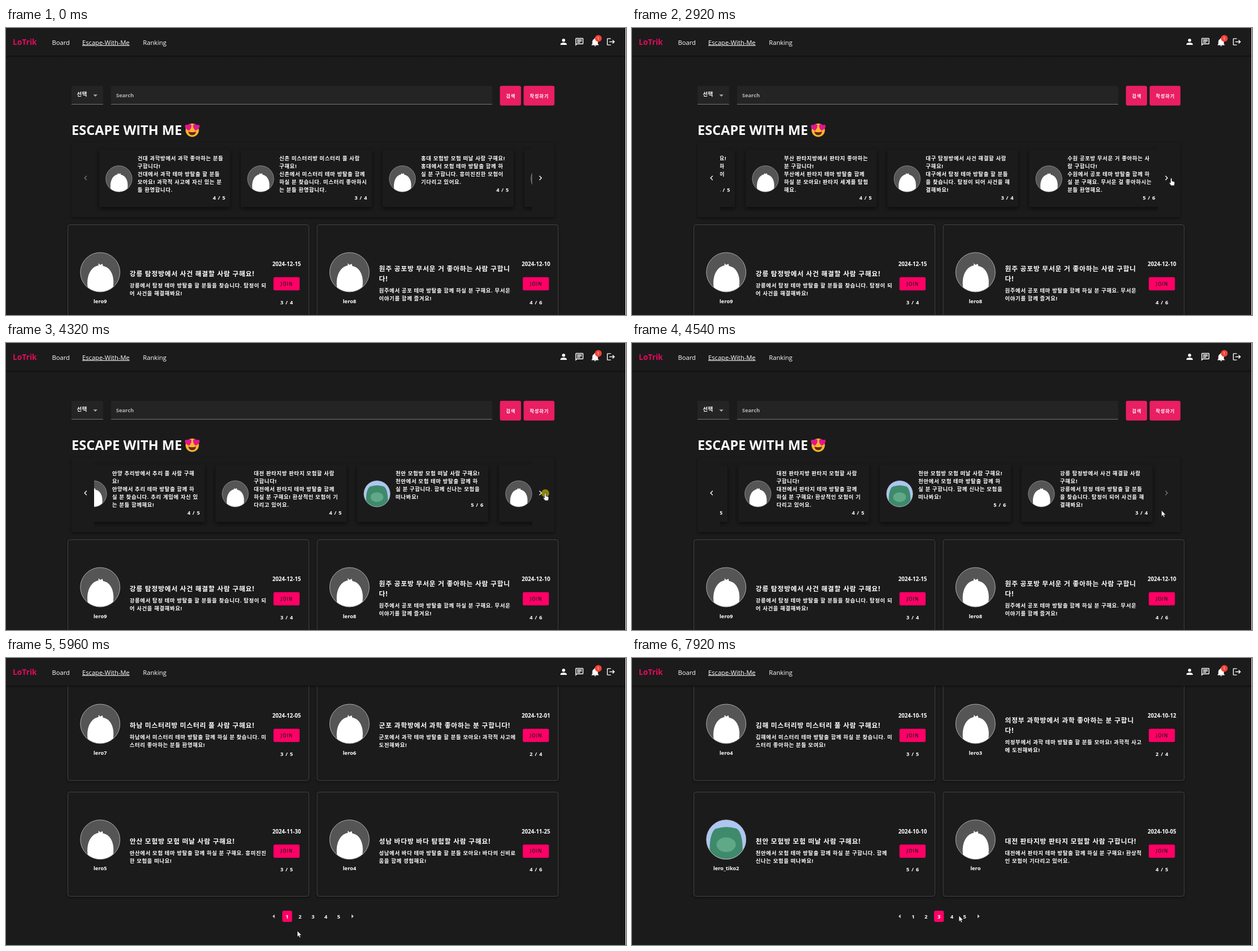
Write an HTML page that moves like this. It is 1098 by 510 pixels and loops after 7990 ms.

```html
<!DOCTYPE html>
<html lang="ko">
<head>
<meta charset="utf-8">
<title>Escape board</title>
<style>
html, body { margin: 0; width: 100%; height: 100%; overflow: hidden; background: #1b1b1b; }
svg { display: block; }
text { font: 700 9.4px "Open Sans", "Noto Sans CJK KR", "Noto Sans CJK", sans-serif; letter-spacing: .68px; fill: #fff; }
.mid { text-anchor: middle; }
.end { text-anchor: end; }
.nav { font-weight: 400; font-size: 11.2px; letter-spacing: 0; }
.logo { font-size: 13.8px; letter-spacing: 0; fill: #e6095f; }
.head { font-size: 23.6px; letter-spacing: 0; }
.title { font-size: 11.8px; letter-spacing: .78px; }
.date { font-size: 9.7px; letter-spacing: 0; }
.name { font-size: 9.4px; letter-spacing: 0; }
.field { letter-spacing: 0; fill: #b4b4b4; }
.join { font-weight: 600; font-size: 8.2px; letter-spacing: .9px; fill: #1b1b1b; }
.btn { font-size: 8.2px; letter-spacing: 1px; }
.badge { font-weight: 400; font-size: 7.5px; letter-spacing: 0; }
.tile { fill: #1b1b1b; filter: drop-shadow(0 3px 4px #0009); }
.tile.hover { fill: #252525; }
.box { fill: #1b1b1b; stroke: #454545; filter: drop-shadow(0 2px 2px #0006); }
</style>
</head>
<body>
<svg id="stage" width="1098" height="510" viewBox="0 0 1098 510"></svg>
<script>
const LOOP = 7990, PITCH = 205.7, PAGE_SCROLL = 522.7, SLIDE_STEP = 251;

// text, member count, has photo
const slides = [
  ['건대 과학방에서 과학 좋아하는 분들|구합니다!|건대에서 과학 테마 방탈출 할 분들|모아요! 과학적 사고에 자신 있는 분|들 환영합니다.', '4 / 5'],
  ['신촌 미스터리방 미스터리 풀 사람|구해요!|신촌에서 미스터리 테마 방탈출 함께|하실 분 찾습니다. 미스터리 좋아하시|는 분들 환영합니다.', '3 / 4'],
  ['홍대 모험방 모험 떠날 사람 구해요!|홍대에서 모험 테마 방탈출 함께 하|실 분 구합니다. 흥미진진한 모험이|기다리고 있어요.', '4 / 5'],
  ['부산 판타지방에서 판타지 좋아하는|분 구합니다!|부산에서 판타지 테마 방탈출 함께|하실 분 모아요! 판타지 세계를 탐험|해요.', '4 / 5'],
  ['대구 탐정방에서 사건 해결할 사람|구해요!|대구에서 탐정 테마 방탈출 할 분들|을 찾습니다. 탐정이 되어 사건을 해|결해봐요!', '3 / 4'],
  ['수원 공포방 무서운 거 좋아하는 사|람 구합니다!|수원에서 공포 테마 방탈출 함께 하|실 분 구해요. 무서운 걸 좋아하시는|분들 환영해요.', '5 / 6'],
  ['안양 추리방에서 추리 풀 사람 구해|요!|안양에서 추리 테마 방탈출 함께 하|실 분 찾습니다. 추리 게임에 자신 있|는 분들 함께해요!', '4 / 5'],
  ['대전 판타지방 판타지 모험할 사람|구합니다!|대전에서 판타지 테마 방탈출 함께|하실 분 구해요! 환상적인 모험이 기|다리고 있어요.', '4 / 5'],
  ['천안 모험방 모험 떠날 사람 구해요!|천안에서 모험 테마 방탈출 함께 하|실 분 구합니다. 함께 신나는 모험을|떠나봐요!', '5 / 6', true],
  ['강릉 탐정방에서 사건 해결할 사람|구해요!|강릉에서 탐정 테마 방탈출 할 분들|을 찾습니다. 탐정이 되어 사건을 해|결해봐요!', '3 / 4'],
];

// Pages 2 and 3 are only seen scrolled down, so they hold just their lower two rows.
const pages = [[
  ['2024-12-15', '3 / 4', 'lero9', '강릉 탐정방에서 사건 해결할 사람 구해요!', '강릉에서 탐정 테마 방탈출 할 분들을 찾습니다. 탐정이 되|어 사건을 해결해봐요!'],
  ['2024-12-10', '4 / 6', 'lero8', '원주 공포방 무서운 거 좋아하는 사람 구합니|다!', '원주에서 공포 테마 방탈출 함께 하실 분 구해요. 무서운|이야기를 함께 즐겨요!'],
  ['2024-12-05', '3 / 5', 'lero7', '하남 미스터리방 미스터리 풀 사람 구해요!', '하남에서 미스터리 테마 방탈출 함께 하실 분 찾습니다. 미|스터리 좋아하는 분들 환영해요!'],
  ['2024-12-01', '2 / 4', 'lero6', '군포 과학방에서 과학 좋아하는 분 구합니다!', '군포에서 과학 테마 방탈출 할 분들 모아요! 과학적 사고에|도전해봐요!'],
  ['2024-11-30', '3 / 5', 'lero5', '안산 모험방 모험 떠날 사람 구해요!', '안산에서 모험 테마 방탈출 함께 하실 분 구해요. 흥미진진|한 모험을 떠나요!'],
  ['2024-11-25', '4 / 6', 'lero4', '성남 바다방 바다 탐험할 사람 구해요!', '성남에서 바다 테마 방탈출 할 분들 모아요! 바다의 신비로|움을 함께 경험해요!'],
], [
  ['2024-11-10', '4 / 5', 'lero1', '안양 추리방에서 추리 풀 사람 구해요!', '안양에서 추리 테마 방탈출 함께 하실 분 찾습니다. 추리|게임에 자신 있는 분들 함께해요!'],
  ['2024-11-05', '5 / 6', 'lero9', '수원 공포방 무서운 거 좋아하는 사람 구합니|다!', '수원에서 공포 테마 방탈출 함께 하실 분 구해요. 무서운|걸 좋아하시는 분들 환영해요.'],
  ['2024-11-01', '3 / 4', 'lero8', '대구 탐정방에서 사건 해결할 사람 구해요!', '대구에서 탐정 테마 방탈출 할 분들을 찾습니다. 탐정이 되|어 사건을 해결해봐요!'],
  ['2024-10-25', '4 / 5', 'lero7', '부산 판타지방에서 판타지 좋아하는 분 구합|니다!', '부산에서 판타지 테마 방탈출 함께 하실 분 모아요! 판타지|세계를 탐험해요.'],
], [
  ['2024-10-15', '3 / 5', 'lero4', '김해 미스터리방 미스터리 풀 사람 구해요!', '김해에서 미스터리 테마 방탈출 함께 하실 분 찾습니다. 미|스터리 좋아하는 분들 모여요!'],
  ['2024-10-12', '2 / 4', 'lero3', '의정부 과학방에서 과학 좋아하는 분 구합니|다!', '의정부에서 과학 테마 방탈출 할 분들 모아요! 과학적 사고|에 도전해봐요!'],
  ['2024-10-10', '5 / 6', 'lero_tiko2', '천안 모험방 모험 떠날 사람 구해요!', '천안에서 모험 테마 방탈출 함께 하실 분 구합니다. 함께|신나는 모험을 떠나봐요!', true],
  ['2024-10-05', '4 / 5', 'lero', '대전 판타지방 판타지 모험할 사람 구합니다!', '대전에서 판타지 테마 방탈출 함께 하실 분 구해요! 환상적|인 모험이 기다리고 있어요.'],
]];

const text = (x, y, s, cls = '', more = '') => `<text x="${x}" y="${y}" class="${cls}" ${more}>${s}</text>`;
const lines = (x, y, s, step, cls) => s.split('|').map((l, i) => text(x, y + i * step, l, cls)).join('');
const rect = (x, y, w, h, r, fill) => `<rect x="${x}" y="${y}" width="${w}" height="${h}" rx="${r}" fill="${fill}"/>`;
const path = (d, fill = '#fff', more = '') => `<path d="${d}" fill="${fill}" ${more}/>`;
const group = (x, y, body) => `<g transform="translate(${x} ${y})">${body}</g>`;
// 24-unit icon centred on x, y
const icon = (x, y, d, id = '') => `<g id="${id}" transform="translate(${x} ${y}) scale(.7) translate(-12 -12)">${path(d, '#fff', 'fill-rule="evenodd"')}</g>`;

const drake = path('M-22 27C-25 6-16-10-3-12L-3-16 0-13 4-15 5-11C19-9 26 8 23 26A35 35 0 0 1-22 27Z');
const seal = path('M-29 19C-30-2-24-20-16-20Q0-25 17-20C25-18 30 0 29 19A35 35 0 0 1-29 19Z', '#3f8a6b') +
  '<ellipse cy="9" rx="17" ry="13" fill="#5fa888"/>';
const avatar = (x, y, r, photo) => `<g transform="translate(${x} ${y}) scale(${r / 35})">
  <circle r="35" fill="${photo ? '#adc6f2' : '#555'}"/>${photo ? seal : drake}
  <circle r="35" fill="none" stroke="#bbb" stroke-width=".9"/></g>`;

const slide = ([body, count, photo], i) => group(165 + i * SLIDE_STEP, 216,
  `<rect class="tile" width="232" height="102" rx="2"/>` + avatar(35, 52, 23.2, photo) +
  lines(68, 19.3, body, 14) + text(224, 19.3 + 14 * body.split('|').length, count, 'end'));

function post([date, count, name, title, body, photo], n) {
  const rows = title.split('|').length, y = 91.6 - (rows - 1) * 9;
  return group(n % 2 ? 551 : 109.5, 349.5 + (n >> 1) * PITCH,
    `<rect class="box" width="427" height="185.3" rx="4"/>` + avatar(57.3, 84.5, 35, photo) +
    text(57.3, 139, name, 'name mid') + lines(109.5, y, title, 18, 'title') +
    lines(109.5, y + rows * 18 + 2.2, body, 14) + text(387.5, 73.5, date, 'date mid') +
    rect(364.2, 93.3, 46.3, 23.4, 2.5, '#ff0066') + text(387.8, 108, 'JOIN', 'join mid') +
    text(387.8, 141, count, 'mid'));
}

const numbers = [0, 1, 2, 3, 4];
const pageX = n => 498 + n * 22.8;
const pagerY = 459 + PAGE_SCROLL;
const heart = (x, y, turn) => `<g transform="translate(${x} ${y}) rotate(${turn})">${path('M0 6.5C-8 1-6.5-5-3-5-1-5 0-3 0-3S1-5 3-5C6.5-5 8 1 0 6.5Z', '#e3148f')}</g>`;

stage.innerHTML = `<defs>
  <linearGradient id="shade" x2="0" y2="1"><stop stop-color="#000" stop-opacity=".45"/><stop offset="1" stop-opacity="0"/></linearGradient>
  <clipPath id="view"><rect x="156" y="203" width="776" height="124"/></clipPath></defs>
  ${rect(0, 0, 1098, 510, 0, '#1b1b1b')}
  <g id="content">
    ${rect(116, 103, 56, 32, 2, '#242424') + rect(116, 135, 56, 1, 0, '#777')}
    ${text(125.5, 120.9, '선택') + path('M154.5 118.3h7.4l-3.7 3.7z', '#aaa')}
    ${rect(186, 103, 675, 32, 2, '#242424') + rect(186, 135, 675, 1, 0, '#777')}
    ${text(195, 122.5, 'Search', 'field')}
    ${rect(874.7, 102.7, 37.4, 35, 3, '#e91e63') + text(894, 123.6, '검색', 'btn mid')}
    ${rect(916.7, 102.7, 54.6, 35, 3, '#e91e63') + text(944.5, 123.6, '작성하기', 'btn mid')}
    ${text(116, 189.5, 'ESCAPE WITH ME', 'head')}
    ${group(329.8, 181.6, '<circle r="11.8" fill="#fdb52c"/>' +
      path('M-6.8 2.5q7 2.5 13.6 0-1 6.5-6.8 6.5t-6.8-6.5z', '#5a2a1a') + heart(-6.8, -5.5, -12) + heart(7, -5.5, 12))}
    <rect class="tile" x="116" y="203" width="855" height="133" style="filter:drop-shadow(0 2px 2px #0007)"/>
    <g clip-path="url(#view)"><g id="track">${slides.map(slide).join('')}</g></g>
    ${icon(141, 266.5, 'M15.4 16.6L10.8 12l4.6-4.6L14 6l-6 6 6 6z', 'prevBtn')}
    ${icon(946.5, 266.5, 'M8.6 16.6L13.2 12 8.6 7.4 10 6l6 6-6 6z', 'nextBtn')}
    ${pages.map(p => `<g class="page">${p.map((q, i) => post(q, i + 6 - p.length)).join('')}</g>`).join('')}
    ${path(`M475.7 ${pagerY - 3.5}v7l-3.7-3.5z`, '#ccc') + path(`M612 ${pagerY - 3.5}v7l3.7-3.5z`, '#ccc')}
    <rect id="active" y="${pagerY - 10}" width="17.4" height="20" rx="3" fill="#ff0066"/>
    ${numbers.map(n => text(pageX(n) + .3, pagerY + 3.6, n + 1, 'mid')).join('')}
  </g>
  ${rect(0, 0, 1098, 49, 0, '#1b1b1b') + rect(0, 49, 1098, 4, 0, 'url(#shade)')}
  ${text(12, 29.5, 'LoTrik', 'logo') + text(81.5, 29.5, 'Board', 'nav')}
  ${text(135, 29.5, 'Escape-With-Me', 'nav', 'text-decoration="underline"') + text(242.5, 29.5, 'Ranking', 'nav')}
  ${icon(987.5, 24.5, 'M12 4a4 4 0 1 1 0 8a4 4 0 0 1 0-8m0 10c4.4 0 8 1.8 8 4v2H4v-2c0-2.2 3.6-4 8-4z')}
  ${icon(1015.5, 24.8, 'M20 2H4a2 2 0 0 0-2 2v18l4-4h14a2 2 0 0 0 2-2V4a2 2 0 0 0-2-2M4 4h16v12H5.2L4 17.2zM6 6h12v2H6zM6 9h12v2H6zM6 12h8v2H6z')}
  ${icon(1043.3, 24.8, 'M21 19v1H3v-1l2-2v-6c0-3.1 2-5.8 5-6.7V4a2 2 0 0 1 4 0v.3c3 .9 5 3.6 5 6.7v6zM14 21a2 2 0 0 1-4 0z')}
  ${icon(1071.3, 24.5, 'M17 7l-1.4 1.4 2.6 2.6H8v2h10.2l-2.6 2.6L17 17l5-5zM4 5h8V3H4a2 2 0 0 0-2 2v14a2 2 0 0 0 2 2h8v-2H4z')}
  <circle cx="1049" cy="18.6" r="6" fill="#f44336"/>${text(1049, 21.4, '1', 'mid badge')}
  ${rect(1097, 0, 1, 510, 0, '#fff')}
  <g id="pointer" stroke="#111" stroke-width=".6">
    <circle id="press" r="7" fill="#fff000" fill-opacity=".5" stroke="none"/>
    ${path('M0 0v10.5l2.4-2.2 1.6 3.7 1.8-.8-1.6-3.6h3.2z', '#fff', 'id="arrow"')}
    ${path('M-1.2 1q0-1.2 1.2-1.2t1.2 1.2v4l3.6 1q1.5.4 1.3 2l-.8 5h-5.6l-3.4-4.6q.4-1.5 2.5 0z', '#fff', 'id="finger"')}
  </g>`;

// time, x, y of the pointer
const moves = [
  [120, 974, 462], [190, 800, 400], [260, 580, 310], [330, 437, 250], [460, 437, 250],
  [530, 440, 270], [600, 400, 272], [670, 365, 235], [740, 390, 185], [810, 450, 163],
  [880, 500, 180], [950, 511, 220], [1020, 450, 195], [1090, 385, 162], [1880, 385, 162],
  [1950, 468, 185], [2090, 620, 215], [2280, 870, 258], [2420, 978, 268], [2650, 955, 267],
  [4460, 955, 267], [4530, 945, 295], [4660, 860, 325], [4790, 700, 250], [4920, 550, 131],
  [5080, 430, 190], [5290, 378.5, 277], [5760, 378.5, 277], [5830, 420, 350], [5900, 490, 450],
  [5960, 516, 485], [6030, 516, 485], [6240, 521, 462], [6570, 521, 462], [6850, 551, 465],
  [6910, 551, 465], [7170, 551, 458], [7580, 551, 458], [7920, 579, 458],
];
const clicks = [2780, 3530, 4320, 6380, 7440];
const offsets = [0, 775.5, 1551, 1734];
const easeOut = p => 1 - (1 - Math.min(1, Math.max(0, p))) ** 2;
const show = (el, on) => el.style.display = on ? '' : 'none';
const tiles = [...track.querySelectorAll('.tile')];
const pageEls = document.querySelectorAll('.page');

function pointerAt(t) {
  const i = moves.findIndex(m => m[0] > t);
  if (i < 1) return moves.at(i).slice(1);
  const [t0, x0, y0] = moves[i - 1], [t1, x1, y1] = moves[i], p = (t - t0) / (t1 - t0);
  return [x0 + (x1 - x0) * p, y0 + (y1 - y0) * p];
}

function draw(t) {
  const [x, y] = pointerAt(t);
  const scroll = PAGE_SCROLL * easeOut((t - 5445) / 185);
  const shift = clicks.slice(0, 3).reduce((sum, c, i) =>
    sum + (offsets[i + 1] - offsets[i]) * easeOut((t - c - 12) / 178), 0);
  const page = t < 6450 ? 0 : t < 7510 ? 1 : 2;
  const canNext = shift < offsets[3] - .5;
  const docY = y + scroll;

  content.setAttribute('transform', `translate(0 ${-scroll})`);
  track.setAttribute('transform', `translate(${-shift} 0)`);
  prevBtn.setAttribute('opacity', shift > 0 ? 1 : .4);
  nextBtn.setAttribute('opacity', canNext ? 1 : .4);
  pageEls.forEach((el, i) => show(el, i === page));
  active.setAttribute('x', pageX(page) - 8.7);

  const inTrack = t >= 120 && x > 156 && x < 932 && docY > 216 && docY < 318;
  const overTile = tiles.map((el, i) => {
    const left = 165 + i * SLIDE_STEP - shift, on = inTrack && x > left && x < left + 232;
    el.classList.toggle('hover', on);
    return on;
  }).includes(true);
  const overNext = canNext && x > 932 && x < 971 && docY > 248 && docY < 286;
  const overNumber = Math.abs(docY - pagerY) < 10 && numbers.some(n => Math.abs(x - pageX(n)) < 8.5);
  const pointing = overTile || overNext || overNumber;

  show(pointer, t >= 120);
  pointer.setAttribute('transform', `translate(${x} ${y})`);
  show(finger, pointing);
  show(arrow, !pointing);
  show(press, clicks.some(c => t >= c && t < c + 100));
}

const start = performance.now();
(function tick() {
  draw((performance.now() - start) % LOOP);
  requestAnimationFrame(tick);
})();
</script>
</body>
</html>
```
